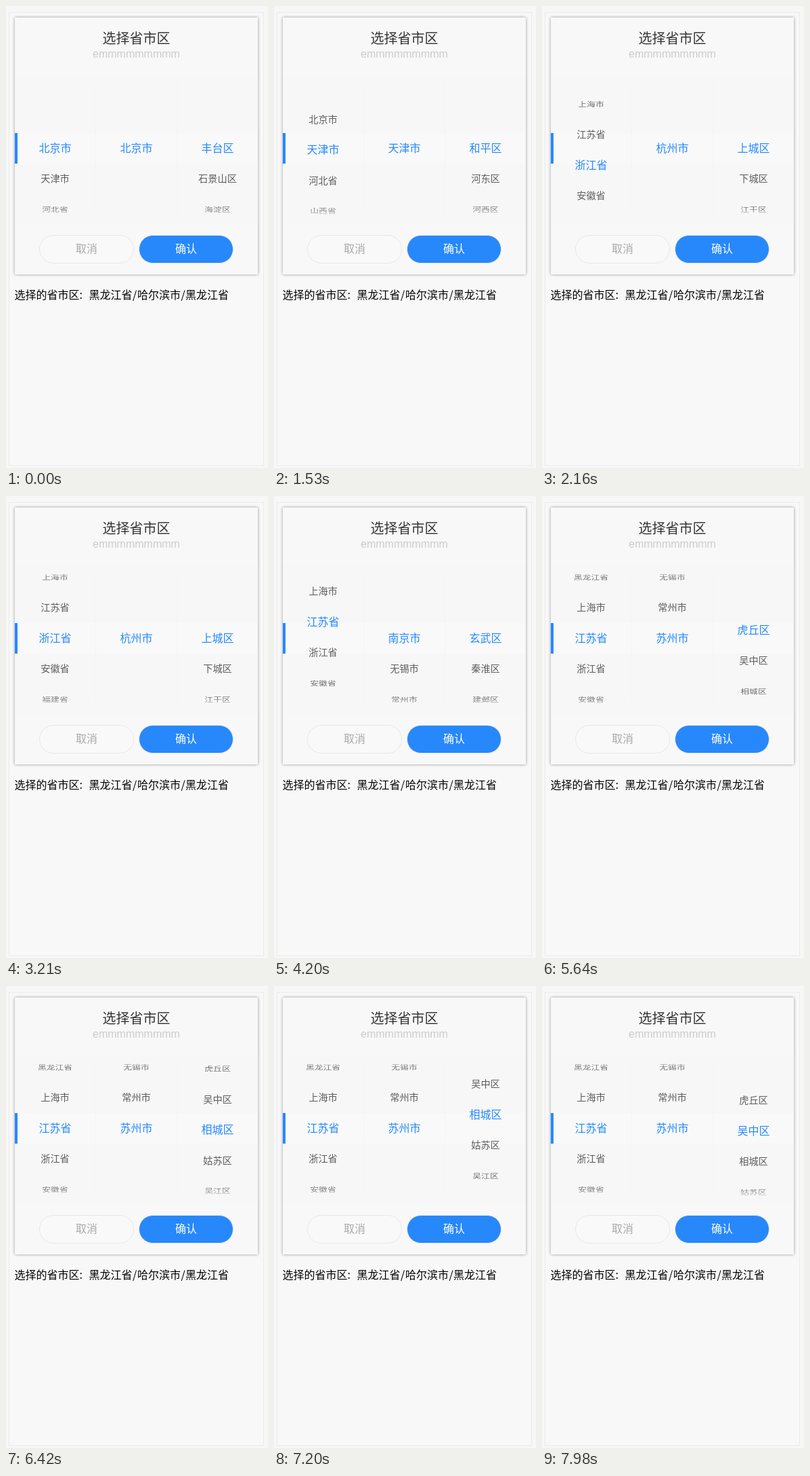
These frames come from a looping animation (387x680 px, 8000 ms). An HTML page:

```html
<!DOCTYPE html>
<html lang="zh-CN">
<head>
<meta charset="utf-8">
<title>选择省市区</title>
<style>
  html, body { margin: 0; width: 100%; height: 100%; overflow: hidden; background: #f7f7f7; }
  svg { position: absolute; left: 0; top: 0; font: 16px "Noto Sans CJK SC", "Noto Sans CJK", sans-serif; }
  .card { position: absolute; left: 13px; top: 17px; width: 359px; height: 378px; border-radius: 1px;
    background: #f8f8f8; box-shadow: 0 0 4px rgba(0, 0, 0, .4); }
  .frame { position: absolute; left: 4px; top: 9px; width: 375px; height: 666px;
    border: 1px solid #ebebeb; background: #f8f8f8; }
</style>
</head>
<body>
<div class="frame"></div>
<div class="card"></div>
<svg width="387" height="680" viewBox="0 0 387 680">
  <defs>
    <linearGradient id="fade" gradientUnits="userSpaceOnUse" x1="0" y1="104" x2="0" y2="314">
      <stop offset="0" stop-color="#fff" stop-opacity="0"/>
      <stop offset=".08" stop-color="#fff"/>
      <stop offset=".92" stop-color="#fff"/>
      <stop offset="1" stop-color="#fff" stop-opacity="0"/>
    </linearGradient>
    <mask id="window" maskUnits="userSpaceOnUse" x="13" y="104" width="359" height="210">
      <rect x="13" y="104" width="359" height="210" fill="url(#fade)"/>
    </mask>
  </defs>
  <g text-anchor="middle">
    <text x="192.5" y="54.7" font-size="20" fill="#333">选择省市区</text>
    <text x="192.5" y="76" fill="#cbcbcb" font-family="Liberation Sans, sans-serif">emmmmmmmmm</text>
  </g>
  <rect x="13" y="102" width="359" height="85" fill="#f7f7f7"/>
  <rect x="13" y="187" width="359" height="45" fill="#f9f9f9"/>
  <rect x="13" y="232" width="359" height="89" fill="#f7f7f7"/>
  <path d="M132.5 104V312M252.5 104V312" stroke="#f4f4f4" mask="url(#window)"/>
  <rect x="13" y="187" width="4" height="45" fill="#2589ff"/>
  <g id="wheels" text-anchor="middle" mask="url(#window)"></g>
  <g text-anchor="middle" stroke-width="1">
    <rect x="49.5" y="337.5" width="139" height="41" rx="20.5" fill="#f9f9f9" stroke="#e8e8e8"/>
    <text x="119" y="363" fill="#aaa">取消</text>
    <rect x="196.5" y="337.5" width="139" height="41" rx="20.5" fill="#2788fb" stroke="#e8e8e8"/>
    <text x="266" y="363" fill="#fff" font-weight="500">确认</text>
  </g>
  <text y="431"><tspan x="12.5">选择的省市区:</tspan><tspan x="122.5">黑龙江省</tspan><tspan x="187">/</tspan><tspan x="194">哈尔滨市</tspan><tspan x="258.5">/</tspan><tspan x="265">黑龙江省</tspan></text>
</svg>
<script>
const LOOP = 8000, STEP = 30, ROW = 45, CENTER_Y = 209.5;
const COLUMN_X = [72.5, 192.5, 312.5];

const words = text => text.split(' ');
const provinces = words('北京市 天津市 河北省 山西省 内蒙古自治区 辽宁省 吉林省 黑龙江省 上海市 江苏省 浙江省 安徽省 福建省 江西省 山东省 河南省');
const regions = {
  北京市: { 北京市: '丰台区 石景山区 海淀区' },
  天津市: { 天津市: '和平区 河东区 河西区' },
  上海市: { 上海市: '黄浦区 徐汇区 长宁区' },
  浙江省: { 杭州市: '上城区 下城区 江干区' },
  江西省: { 南昌市: '东湖区 西湖区 青云谱区' },
  江苏省: {
    南京市: '玄武区 秦淮区 建邺区',
    无锡市: '崇安区 南长区 北塘区',
    常州市: '天宁区 钟楼区 戚墅堰区',
    苏州市: '虎丘区 吴中区 相城区 姑苏区 吴江区 常熟市'
  }
};

// Each swipe: start, end, column, target row, rows dragged before release
const swipes = [
  [1140, 1320, 0, 1], [1530, 1800, 0, 8], [1950, 2220, 0, 10],
  [2430, 2700, 0, 13], [2970, 3210, 0, 10], [3960, 4380, 0, 9],
  [4560, 4830, 1, 2], [5010, 5160, 1, 3],
  [5580, 5850, 2, 2], [6420, 6660, 2, 3], [7050, 7290, 2, 2], [7620, 8046, 2, 1, 1.45]
];

// Look of a row by its distance from the selected one
const looks = [
  { sx: 1, sy: 1, fill: '#2589ff' },
  { sx: .89, sy: .85, fill: '#5c5c5c' },
  { sx: .8, sy: .56, fill: '#6c6c6c' }
];

const smooth = p => p * p * (3 - 2 * p);

function stateAt(time) {
  const selected = [0, 0, 0], offset = [0, 0, 0];
  for (const [start, end, column, target, drag = .41] of swipes) {
    if (time < start) break;
    const from = selected[column], direction = Math.sign(target - from);
    const p = Math.min(1, (time - start + STEP) / (end - start + STEP));
    if (p < .5) {
      // a press nudges the wheel slightly down first
      offset[column] = time - start < STEP ? 2.5 : -direction * drag * ROW * smooth(p * 2);
    } else {
      selected[column] = target;
      selected.fill(0, column + 1);
      const left = target - from - direction * drag;
      offset[column] = left * ROW * (1 - smooth(p * 2 - 1));
    }
  }
  return { selected, offset };
}

const wheels = document.getElementById('wheels');
const rows = COLUMN_X.map(() => [-2, -1, 0, 1, 2].map(distance => {
  const node = document.createElementNS('http://www.w3.org/2000/svg', 'text');
  const look = looks[Math.abs(distance)];
  node.setAttribute('y', 5.4);
  node.setAttribute('fill', look.fill);
  wheels.append(node);
  return { node, distance, look };
}));

function draw(time) {
  const { selected, offset } = stateAt(Math.floor(time / STEP) * STEP);
  const cities = regions[provinces[selected[0]]];
  const cityNames = Object.keys(cities);
  const lists = [provinces, cityNames, words(cities[cityNames[selected[1]]])];
  rows.forEach((column, c) => column.forEach(({ node, distance, look }) => {
    const y = CENTER_Y + distance * ROW + offset[c];
    node.textContent = lists[c][selected[c] + distance] || '';
    node.setAttribute('transform', `translate(${COLUMN_X[c]} ${y}) scale(${look.sx} ${look.sy})`);
  }));
}

const began = performance.now();
function tick() {
  draw((performance.now() - began) % LOOP);
  requestAnimationFrame(tick);
}
tick();
</script>
</body>
</html>
```
